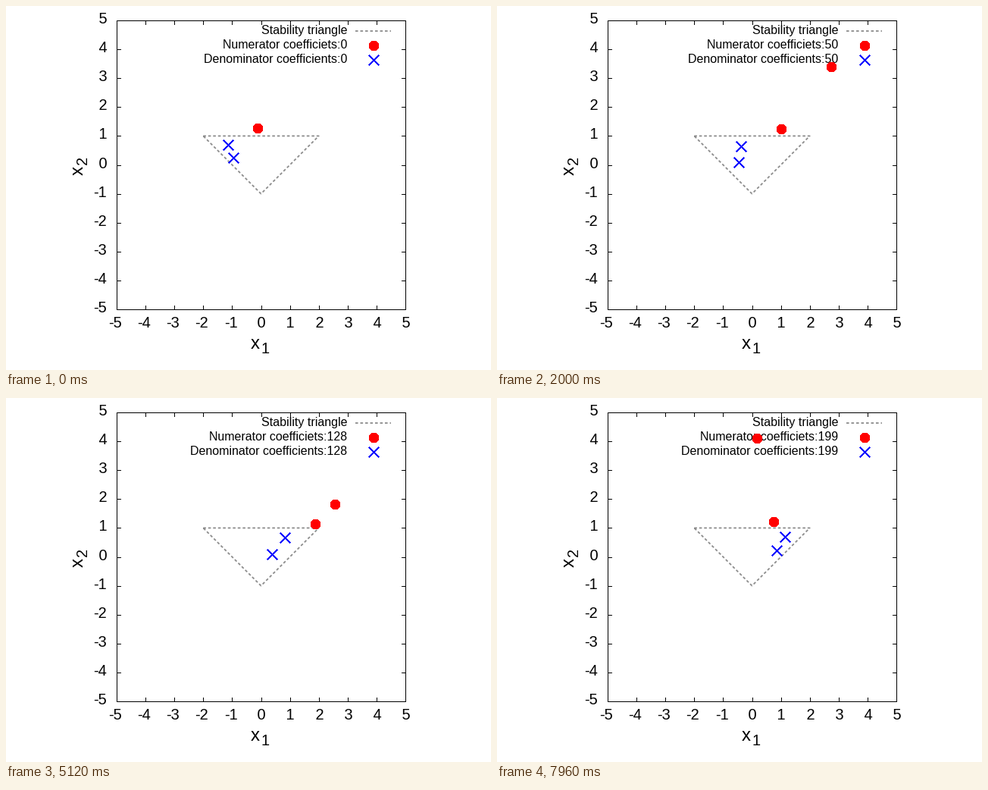
Animation, 640 px wide and 480 px high, one loop 8 s. Source, as a matplotlib script:

```python
import numpy as np
import matplotlib.pyplot as plt
from matplotlib.animation import FuncAnimation
from matplotlib.patches import Circle

plt.rcParams["font.family"] = "Liberation Sans"
plt.rcParams["lines.scale_dashes"] = False

PT = 0.9            # points per pixel at 80 dpi
FRAMES, STEP = 200, 40
TURN = 149          # frame where the motion changes direction
LEFT, RIGHT, TOP, BOTTOM = 146, 527, 19, 400
UNIT = (RIGHT - LEFT) / 10

fig = plt.figure(figsize=(8, 6), dpi=80, facecolor="white")
ax = fig.add_axes([0, 0, 1, 1])
ax.set_xlim(0, 640)
ax.set_ylim(480, 0)
ax.axis("off")


def sx(x):
    return LEFT + (x + 5) * UNIT


def sy(y):
    return BOTTOM - (y + 5) * UNIT


def line(xs, ys, color="black", width=1.0, **kw):
    return ax.plot(xs, ys, color=color, lw=width * PT, **kw)[0]


def label(x, y, s, size, ha="left", **kw):
    return ax.text(x, y, s, fontsize=size * PT, ha=ha, va="baseline",
                   color="black", **kw)


def dashed(xs, ys):
    line(xs, ys, "#8c8c8c", 1.8, dashes=(3.6 * PT, 2.9 * PT),
         dash_capstyle="butt", zorder=2)


class Dot:
    def __init__(self):
        self.art = ax.add_patch(Circle((0, 0), 6.3, fc="red", ec="none",
                                       aa=False, zorder=6))

    def move(self, x, y):
        self.art.center = x, y
        self.art.set_visible(y >= TOP)


class Cross:
    def __init__(self):
        self.art = line([], [], "blue", aa=False, snap=False, zorder=5,
                        solid_capstyle="projecting")

    def move(self, x, y):
        arm = np.array([-6, 6, np.nan, -6, 6])
        self.art.set_data(x + arm, y + arm * [1, 1, 1, -1, -1])


# frame, ticks and axis names
line([LEFT, RIGHT, RIGHT, LEFT, LEFT], [TOP, TOP, BOTTOM, BOTTOM, TOP])
for v in range(-5, 6):
    x, y = sx(v), sy(v)
    for edge, d in ((TOP, 5), (BOTTOM, -5)):
        line([x, x], [edge, edge + d])
    for edge, d in ((LEFT, 5), (RIGHT, -5)):
        line([edge, edge + d], [y, y])
    label(x - 1.8, 424, f"{v: d}", 20, "center")
    label(133.3, y + 4, f"{v: d}", 20, "right")

turned = dict(rotation=90, rotation_mode="anchor")
label(323, 452, "x", 24)
label(337, 458, "1", 20)
label(102, 223, "x", 24, **turned)
label(107, 209, "2", 20, **turned)

# stability triangle and legend
dashed([sx(-2), sx(2), sx(0), sx(-2)], [sy(1), sy(1), sy(-1), sy(1)])
dashed([461, 508], [33, 33])
Dot().move(485.5, 52.5)
Cross().move(485.5, 71.5)
label(450.5, 37, "Stability triangle", 16, "right")
num_text = label(450.5, 56, "", 16, "right")
den_text = label(450.5, 75, "", 16, "right")


def path(start, turn, end, bow, weight=1):
    """A bowed run from start to turn, then a straight one to end."""
    start, turn, end, bow = map(np.array, (start, turn, end, bow))

    def at(n):
        if n <= TURN:
            t = n / TURN
            t = weight * t / (1 - t + weight * t)
            p = start + (turn - start) * t + bow * t * (1 - t)
        else:
            t = (n - TURN) / (FRAMES - 1 - TURN)
            p = turn + (end - turn) * t ** 1.2
        return np.floor(p) + 0.5        # whole pixels
    return at


moving = [
    (Dot(), path((332.5, 161.5), (410.5, 168.5), (365, 163.5), (75, -5))),
    (Dot(), path((356, -32), (430, 149.5), (343.5, 53.5), (167, 0), 3.22)),
    (Cross(), path((293, 183), (381, 182.5), (380, 183.5), (0, 13))),
    (Cross(), path((300, 200), (360.5, 204.5), (369.5, 201.5), (-5, 24))),
]


def draw(n):
    num_text.set_text(f"Numerator coefficiets:{n}")
    den_text.set_text(f"Denominator coefficients:{n}")
    for mark, at in moving:
        mark.move(*at(n))
    return [num_text, den_text] + [mark.art for mark, _ in moving]


anim = FuncAnimation(fig, draw, frames=FRAMES, interval=STEP,
                     init_func=lambda: draw(0), repeat=True, repeat_delay=0)
plt.show()
```
